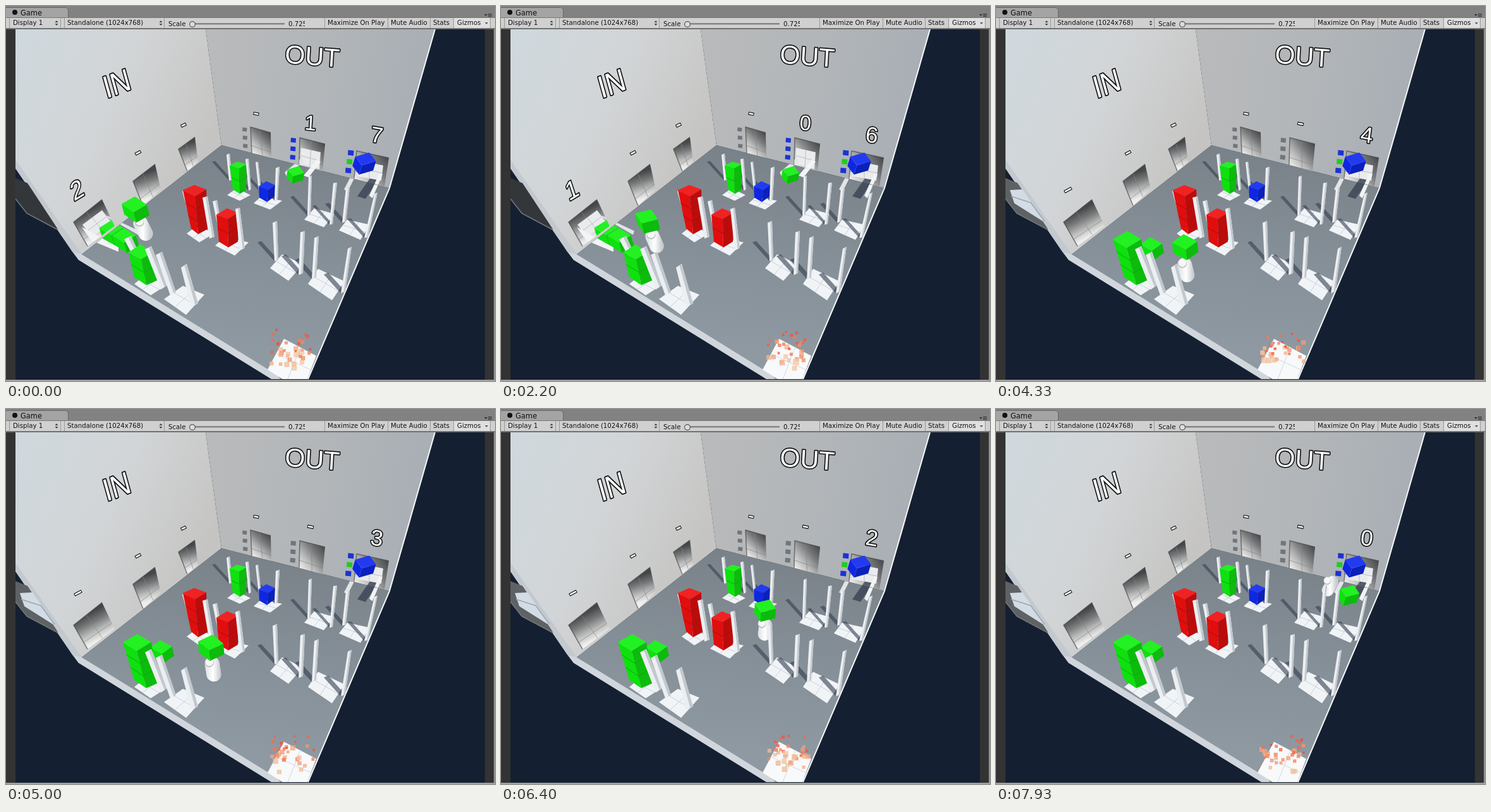
An HTML page with a canvas that plays this animation: 774x595 px, repeating every 8000 ms.

```html
<!DOCTYPE html>
<html>
<head>
<meta charset="utf-8">
<style>
html, body { margin: 0; width: 100%; height: 100%; overflow: hidden; background: #333; }
canvas { display: block; width: 774px; height: 595px; }
</style>
</head>
<body>
<canvas id="stage" width="774" height="595"></canvas>
<script>
const LOOP = 8000;
const g = document.getElementById('stage').getContext('2d');
const TURNS = [1330, 2200, 3070, 3930, 4800, 5670, 6530, 7400];
const UI = '"DejaVu Sans", sans-serif';
const HUES = { green: 120, blue: 233, red: 0 };

// Geometry helpers
const points = s => s.split(' ').map(p => p.split(',').map(Number));
const mix = (a, b, u) => a + (b - a) * u;
const mid = (a, b, u = 0.5) => [mix(a[0], b[0], u), mix(a[1], b[1], u)];
const clamp = u => Math.max(0, Math.min(1, u));
const ease = u => (u = clamp(u)) * u * (3 - 2 * u);
const rand = n => { const v = Math.sin(n * 127.1 + 3.7) * 43758.5453; return v - Math.floor(v); };

function trace(pts) {
  pts.forEach(([x, y], i) => i ? g.lineTo(x, y) : g.moveTo(x, y));
  g.closePath();
}
function poly(fill, shape) {
  g.beginPath();
  trace(typeof shape === 'string' ? points(shape) : shape);
  g.fillStyle = fill;
  g.fill();
}
function line(color, width, ...pts) {
  g.beginPath();
  pts.forEach(([x, y], i) => i ? g.lineTo(x, y) : g.moveTo(x, y));
  g.strokeStyle = color;
  g.lineWidth = width;
  g.stroke();
}
function rect(color, x, y, w, h) { g.fillStyle = color; g.fillRect(x, y, w, h); }
function disc(color, x, y, r) {
  g.beginPath();
  g.arc(x, y, r, 0, 7);
  g.fillStyle = color;
  g.fill();
}
function gradient(a, b, ...colors) {
  const fill = g.createLinearGradient(a[0], a[1], b[0], b[1]);
  colors.forEach((c, i) => fill.addColorStop(i / (colors.length - 1), c));
  return fill;
}
const shade = (name, light) => `hsl(${HUES[name]},88%,${light}%)`;

// Scene pieces
const FLOOR = points('341,221 607,289 477,592 430,592 120,394');
const DOORS = {
  in1: points('107,343 152,307 172,349 129,381'),
  in2: points('201,278 236,251 245,291 217,317'),
  in3: points('273,227 299,208 304,247 287,262'),
  outA: points('387,192 419,201 420,241 389,233'),
  outB: points('465,209 505,219 501,262 464,252'),
  outC: points('555,230 606,241 599,286 551,274')
};
// Each bay: pad corners, left post, right post, optional stack
const BAYS = [
  { pad: '350,300 365,289 387,300 370,309', left: '349,236 354,234 358,276 353,277', right: '379,243 384,242 388,291 384,293',
    color: 'green', n: 2, stack: '354,253 366,247 381,251 369,258 359,291 370,298 380,292', shadow: 1 },
  { pad: '392,313 404,302 437,309 418,323', left: '395,248 399,247 404,291 400,293', right: '427,257 433,255 430,307 425,309',
    color: 'blue', n: 1, stack: '400,286 412,278 426,284 415,292 401,304 413,311 425,302', shadow: 1 },
  { pad: '472,339 488,321 520,330 503,351', left: '479,271 484,269 482,331 477,333', right: '518,281 524,280 517,346 512,347', shadow: 1 },
  { pad: '527,356 540,339 576,347 561,371', left: '538,290 544,288 538,342 532,344', right: '583,298 588,296 573,367 567,368', shadow: 1 },
  { pad: '286,361 303,348 329,361 306,375', left: '279,294 286,290 298,340 292,342', right: '311,304 319,302 330,366 322,369',
    color: 'red', n: 3, stack: '280,292 298,284 317,291 299,302 293,353 304,362 319,354' },
  { pad: '331,380 346,367 384,375 362,396', left: '327,310 334,308 342,352 336,354', right: '363,322 370,320 378,384 370,388',
    color: 'red', n: 2, stack: '333,331 350,321 367,328 351,338 337,374 352,383 367,374' },
  { pad: '418,416 437,394 470,410 447,436', left: '422,344 429,341 431,403 425,405', right: '466,359 473,357 470,424 463,427', shadow: 1 },
  { pad: '478,441 494,417 536,437 516,467', left: '488,368 495,365 491,430 484,433', right: '541,385 547,382 537,453 530,456', shadow: 1 },
  { pad: '203,441 222,426 257,441 229,459', left: '187,370 198,365 214,400 205,404', right: '220,386 230,381 255,443 245,450',
    color: 'green', n: 2, stack: '194,391 213,378 232,391 214,402 203,430 222,443 240,435', grows: 1 },
  { pad: '250,465 280,444 314,458 285,490', left: '237,395 247,390 269,454 260,459', right: '277,415 286,409 304,472 293,478' }
];
const TALL_STACK = '185,370 208,357 230,370 207,384 203,430 222,443 240,435';

function tiles(quad, color = '#c6d2dd') {
  const [a, b, c, d] = quad;
  line(color, 1, mid(a, b), mid(d, c));
  line(color, 1, mid(a, d), mid(b, c));
}
function pad(shape) {
  const quad = points(shape);
  poly('#f1f4f7', quad);
  tiles(quad);
}
function post(shape) {
  const [a, b, c, d] = points(shape);
  poly('#eceff1', [a, b, c, d]);
  poly('#c3c8ce', [mid(a, b, 0.6), b, c, mid(d, c, 0.6)]);
}
function postShadow(shape) {
  const [, , c, d] = points(shape);
  const tip = ([x, y]) => [x - 27, y - 30];
  poly('rgba(52,63,80,.6)', [d, c, tip(c), tip(d)]);
}
function stack(color, n, shape) {
  const [L, B, R, F, l, f, r] = points(shape);
  poly(shade(color, 54), [L, B, R, F]);
  poly(shade(color, 47), [L, F, f, l]);
  poly(shade(color, 39), [F, R, r, f]);
  for (let i = 1; i < n; i++)
    line(shade(color, 35), 1, mid(L, l, i / n), mid(F, f, i / n), mid(R, r, i / n));
}
function cube(color, x, y, w, yaw = 0) {
  const h = w * 0.42, drift = (380 - x) * 0.012;
  const top = [2, 3, 0, 1].map(i => {
    const a = yaw + i * Math.PI / 2;
    return [x - drift + Math.cos(a) * w / 2, y - h / 2 + Math.sin(a) * w * 0.31];
  });
  top.forEach((p, i) => {
    const q = top[(i + 1) % 4];
    if (q[0] >= p[0]) return;
    const down = ([px, py]) => [px + 2 * drift, py + h];
    poly(shade(color, q[1] < p[1] ? 47 : 39), [p, q, down(q), down(p)]);
  });
  poly(shade(color, 54), top);
}
function bay(b, t) {
  post(b.left);
  const grown = b.grows && t >= 2600;
  if (b.stack) stack(b.color, grown ? 3 : b.n, grown ? TALL_STACK : b.stack);
  post(b.right);
}
function agent(p) {
  const lean = (380 - p.x) * 0.025, up = p.w * 0.2;
  const width = p.w * 0.58;
  g.lineCap = 'round';
  line(gradient([p.x - width / 2, p.y], [p.x + width / 2, p.y], '#dfe2e5', '#ffffff', '#c8ccd0'),
    width, [p.x - lean, p.y - up], [p.x + lean, p.y + up]);
  g.lineCap = 'butt';
  const hx = p.x - p.w * 0.14, hy = p.y - p.w * 0.28;
  disc('#b9bdc1', hx, hy + 1, p.w * 0.18);
  disc('#f7f7f7', hx, hy, p.w * 0.16);
  cube('green', p.cx, p.cy, p.w, p.yaw);
}
function ramp(door, panel, rails, dx, dy, cubes) {
  g.save();
  g.beginPath();
  trace(door);
  trace(FLOOR);
  g.clip('nonzero');
  g.translate(dx, dy);
  const quad = points(panel);
  poly('#e9ebed', quad);
  tiles(quad, '#b7bfc6');
  const [back, front] = rails;
  poly('#e1e5e8', back);
  cubes();
  poly('#f2f4f5', front);
  g.restore();
}

// Wall text
function label(text, size, a, b, c, d, x, y) {
  g.save();
  g.transform(a, b, c, d, x, y);
  g.font = size + 'px "Liberation Sans", sans-serif';
  g.textAlign = 'center';
  g.lineJoin = 'round';
  g.lineWidth = 3.2;
  g.strokeStyle = '#111';
  g.fillStyle = '#fff';
  g.strokeText(text, 0, size * 0.36);
  g.fillText(text, 0, size * 0.36);
  g.restore();
}
function dash(x, y, angle, w = 8) {
  g.save();
  g.translate(x, y);
  g.rotate(angle);
  rect('#111', -w / 2 - 1, -2.5, w + 2, 5);
  rect('#fff', -w / 2, -1.3, w, 2.6);
  g.restore();
}
function lights(x, y, dx, dy, size, colors) {
  colors.forEach((c, i) => {
    const px = x + i * dx - size / 2, py = y + i * dy - size / 2;
    poly(c, [[px, py], [px + size, py + 1], [px + size - 0.5, py + size], [px - 0.5, py + size - 1]]);
  });
}

function room() {
  rect('#142031', 15, 37, 743, 556);
  poly('#77737b', '642,172 606,291 609,270');
  poly(gradient([15, 60], [330, 200], '#cfd8dd', '#d2d5d7', '#c5c4c2'), '15,37 316,37 341,221 120,394 104,388 15,246');
  poly(gradient([320, 100], [650, 150], '#b9babb', '#b2b6b9', '#a9afb5'), '316,37 679,37 607,289 341,221');
  poly('#c3c9ce', '15,244 15,258 105,390 115,403 120,394');
  poly(gradient([360, 230], [330, 540], '#7a8289', '#858f97', '#8e99a2'), FLOOR);
  poly('#d0d6dc', '120,394 430,586 434,592 420,592 115,403 107,391');
  line('#f5f6f6', 2, [679, 37], [607, 289], [478, 592]);
  Object.entries(DOORS).forEach(([name, q]) => {
    const inside = name.startsWith('in');
    const from = inside ? mid(q[0], q[1]) : q[1];
    const to = inside ? mid(q[2], q[3]) : q[3];
    poly(gradient(from, to, '#44474a', '#777879', '#b9bab9', '#efefee'), q);
    line('rgba(130,135,138,.7)', 1, mid(q[0], q[3], 0.72), mid(q[1], q[2], 0.78));
    line('rgba(130,135,138,.7)', 1, mid(q[0], q[1], 0.45), mid(q[3], q[2], 0.55));
    line('rgba(65,67,70,.65)', 1.5, q[3], q[0], q[1]);
  });
}
function outside(t) {
  const u = ease((t - 3930) / 350);
  poly('#34373a', '15,273 34,281 82,354 33,329 15,306');
  if (u > 0) {
    g.globalAlpha = u;
    poly('#5e6265', '15,273 34,281 82,354 33,329 15,306');
    poly('#d3dce4', '22,292 42,291 78,344 29,313');
    line('#9aa7b2', 1.5, [24, 302], [55, 312], [77, 342]);
    g.globalAlpha = 1;
  }
  line('#77797a', 1.5, [15, 306], [33, 329], [82, 355]);
}

// Value of the last step that has begun
const since = (t, steps) => steps.filter(s => t >= s[0]).pop()[1];

function signs(t) {
  label('IN', 44, 0.94, -0.36, 0.3, 1.08, 175, 122);
  label('OUT', 41, 1, 0.08, -0.06, 1, 485, 79);
  const inCount = since(t, [[0, 2], [1400, 1], [2270, 0], [3270, '']]);
  const midCount = since(t, [[0, 1], [1400, 0], [2270, '']]);
  const lastCount = since(t, [[0, 7], [1400, 6], [2270, 5], [4000, 4], [4870, 3], [5740, 2], [6600, 1], [7470, 0]]);
  if (inCount === '') dash(114, 292, -0.5, 11);
  else label(inCount, 38, 0.86, -0.53, 0.33, 1, 112, 291);
  if (midCount === '') dash(482, 187, 0.2);
  else label(midCount, 33, 1, 0.1, -0.06, 1, 482, 185);
  label(lastCount, 35, 1, 0.17, -0.13, 1, 587, 204);
  dash(209, 233, -0.5);
  dash(281, 189, -0.45, 7);
  dash(396, 171, 0.2, 7);
  const grey = '#72757a', blue = '#1c32d4', green = '#22cc22';
  lights(378, 196, 0.5, 13, 7, [grey, grey, grey]);
  lights(455, 213, -0.5, 13.5, 8, midCount === '' ? [grey, grey, grey] : [blue, blue, blue]);
  lights(546, 233, -2, 14, 9, [blue, green, blue]);
}

// Start of move, body x y, cube x y, cube width, yaw
const ROUTE = [
  [0, 217, 353, 205, 323, 40, 0.05],
  [1330, 243, 373, 232, 342, 39, 0.4],
  [2200, 208, 374, 195, 345, 41, 0],
  [3200, 271, 396, 265, 363, 39, 0],
  [3930, 301, 419, 300, 383, 40, -0.08],
  [4800, 360, 405, 355, 374, 41, 0.4],
  [5670, 418, 350, 418, 320, 36, 0.4],
  [6530, 472, 303, 476, 272, 32, 0.5],
  [7400, 529, 281, 558, 296, 33, 0.4]
];
function poseAt(t) {
  const i = ROUTE.filter(r => t >= r[0]).length - 1;
  const u = ease((t - ROUTE[i][0]) / 430);
  const [, x, y, cx, cy, w, yaw] = ROUTE[i].map((v, k) => mix(ROUTE[Math.max(0, i - 1)][k], v, u));
  return { x, y, cx, cy, w, yaw };
}

function ramps(t) {
  const away = ease((t - 3270) / 550);
  const lift = ease((t - 2200) / 400);
  if (away < 1)
    ramp(DOORS.in1, '121,347 152,324 167,344 136,367',
      ['155,332 163,334 211,357 209,363', '120,351 128,355 178,383 178,390 135,372'], -85 * away, -48 * away, () => {
        if (t < 3200) cube('green', mix(169, 182, lift), mix(360, 367, lift), 38);
        if (t < 2600) cube('green', mix(189, 207, lift), mix(372, 378, lift), mix(38, 44, lift));
      });
  const out = clamp((t - 3070) / 300);
  if (out < 1)
    ramp(DOORS.outB, '467,225 498,232 496,259 466,250',
      ['468,241 471,247 444,270 441,264', '493,243 498,247 479,272 471,269'], 62 * out, -74 * out,
      () => cube('green', 458, 268, 28, 0.35));
  poly('rgba(48,58,74,.7)', '577,272 590,275 569,306 556,302');
  ramp(DOORS.outC, '553,244 597,253 594,277 556,270',
    ['546,270 552,272 541,294 535,291', '591,265 596,267 580,305 575,301'], 0, 0, () => {});
  cube('blue', 567, 250, 35, 0.35);
}

function sparks(t) {
  const active = TURNS.reduce((sum, s) => sum + Math.max(0, Math.min(t - s, 800)), 0);
  for (let i = 0; i < 34; i++) {
    const age = active / 900 + rand(i), u = age % 1;
    const seed = i * 17 + Math.floor(age) * 53;
    const x = 420 + rand(seed + 1) * 67;
    const y = 546 + rand(seed + 2) * 34 - u * 34;
    const size = mix(8, 3, u) * (0.6 + 0.5 * rand(seed + 3));
    const tone = `hsl(${mix(28, 5, u)},${mix(75, 95, u)}%,${mix(80, 58, u)}%)`;
    g.globalAlpha = 0.75;
    rect(tone, x - size / 2, y - size / 2, size, size);
    g.strokeStyle = tone;
    g.lineWidth = 1;
    g.strokeRect(x - size / 2, y - size / 2, size, size);
  }
  g.globalAlpha = 1;
}

function scene(t) {
  g.save();
  g.beginPath();
  g.rect(15, 37, 743, 556);
  g.clip();
  room();
  outside(t);
  signs(t);
  BAYS.forEach(b => {
    pad(b.pad);
    if (b.shadow) [b.left, b.right].forEach(postShadow);
  });
  poly('#f8f9fa', '440,528 491,555 477,592 438,592 414,577');
  line('#cfdae1', 1, [466, 541], [446, 592]);
  line('#cfdae1', 1, [428, 552], [484, 578]);
  ramps(t);

  const pose = poseAt(t);
  const items = BAYS.map(b => ({ depth: points(b.pad)[0][1], draw: () => bay(b, t) }));
  items.push({ depth: pose.y + pose.w / 2, draw: () => agent(pose) });
  if (t >= 3200) {
    const u = ease((t - 3200) / 430);
    items.push({ depth: 402, draw: () => cube('green', mix(182, 247, u), mix(367, 385, u), 35, -0.08) });
  }
  items.sort((a, b) => a.depth - b.depth).forEach(item => item.draw());
  sparks(t);
  g.restore();
}

// Editor window around the scene
function text(s, x, y, size = 10.2) {
  g.font = size + 'px ' + UI;
  g.textAlign = 'left';
  g.fillStyle = '#111';
  g.fillText(s, x, y);
}
function arrows(x) {
  poly('#444', [[x - 2.5, 26], [x + 2.5, 26], [x, 23]]);
  poly('#444', [[x - 2.5, 28], [x + 2.5, 28], [x, 31]]);
}
function chrome() {
  rect('#333', 0, 0, 774, 595);
  rect('#828282', 0, 0, 774, 19);
  poly('#a4a4a4', '0,19 0,4 3,2 95,2 98,5 98,19');
  line('#686868', 1, [0, 2.5], [95, 2.5], [98.5, 6], [98.5, 18]);
  disc('#111', 14, 10, 4);
  text('Game', 23, 15, 11.4);
  poly('#333', '757,13 762,13 759.5,16');
  for (let y = 12; y < 18; y += 2) rect('#333', 763, y, 6, 1);
  rect('#d0d0d0', 0, 19, 774, 17);
  rect('#e0e0e0', 709, 19, 57, 17);
  rect('#777', 0, 18, 774, 1);
  rect('#707070', 0, 35, 774, 2);
  [5, 86, 92, 250, 504, 604, 671, 708, 766].forEach(x => rect('#999', x, 19, 1, 16));
  text('Display 1', 11, 30);
  text('Standalone (1024x768)', 97, 30);
  text('Scale', 257, 32);
  text('Maximize On Play', 509, 30);
  text('Mute Audio', 609, 30);
  text('Stats', 676, 30);
  text('Gizmos', 714, 30);
  arrows(80);
  arrows(245);
  poly('#555', '758,26 763,26 760.5,29');
  rect('#858585', 293, 27, 148, 3);
  rect('#aaa', 293, 29, 148, 1);
  disc('#555', 295, 29, 5);
  disc('#ddd', 295, 29, 3.8);
  g.save();
  g.beginPath();
  g.rect(445, 20, 28, 15);
  g.clip();
  text('0.725', 447, 32);
  g.restore();
  rect('#8d8d8d', 772, 37, 2, 558);
  rect('#a0a0a0', 0, 593, 774, 2);
}

const start = performance.now();
function frame() {
  const t = (performance.now() - start) % LOOP;
  chrome();
  scene(t);
  requestAnimationFrame(frame);
}
frame();
</script>
</body>
</html>
```
